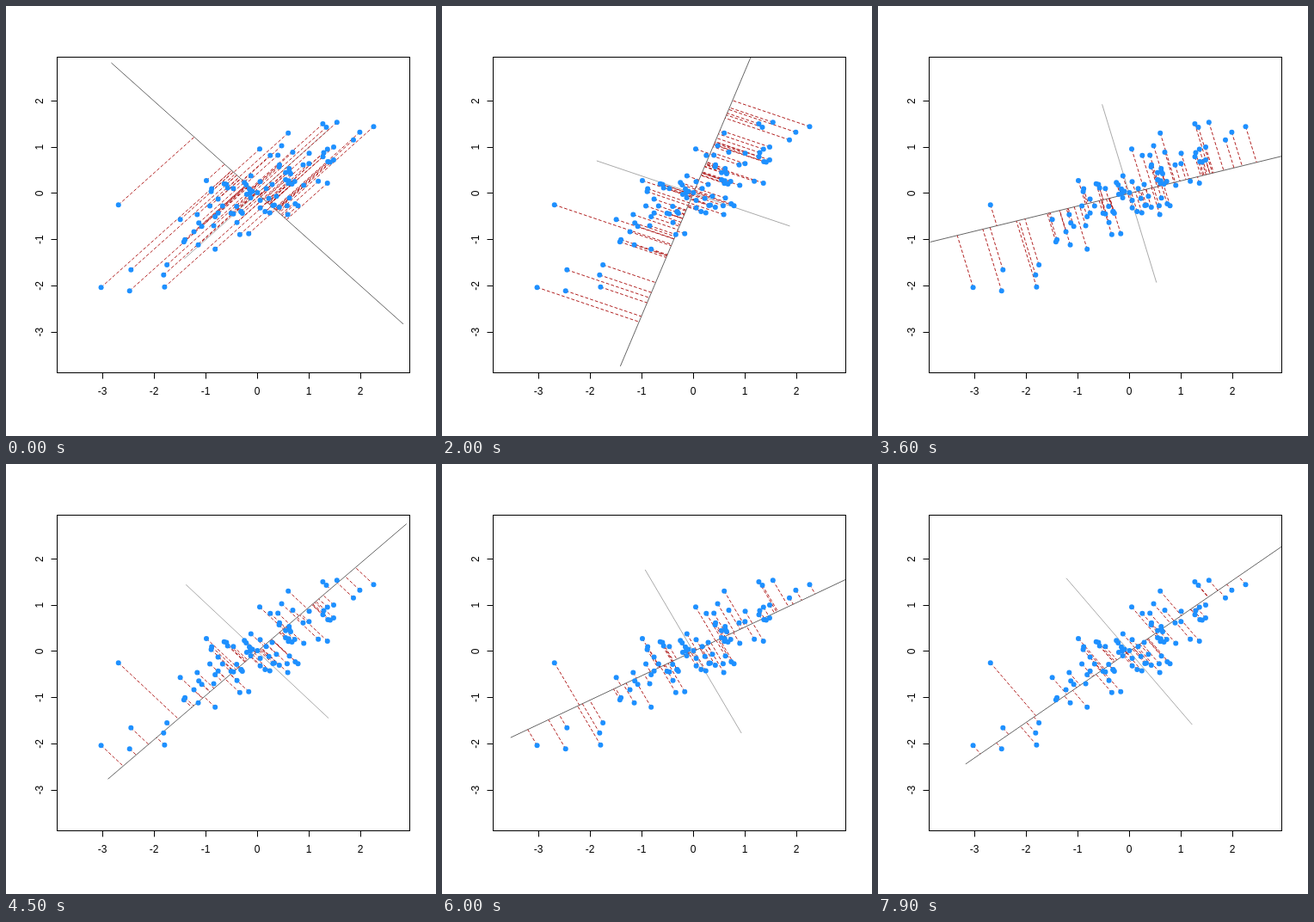
An HTML page with a canvas that plays this animation: 500 px wide and 500 px high, repeating every 8000 ms.

```html
<!DOCTYPE html>
<html>
<head>
<meta charset="utf-8">
<style>
html, body { margin: 0; width: 100%; height: 100%; overflow: hidden; background: #fff; }
canvas { display: block; }
</style>
</head>
<body>
<canvas id="stage" width="500" height="500"></canvas>
<script>
const ctx = document.getElementById('stage').getContext('2d');
const N = 100, STEPS = 80, STEP_MS = 100;
const BOX = { l: 59.04, t: 59.04, r: 469.76, b: 426.56 };

// Mersenne Twister seeded by a linear congruential generator
function uniforms(seed, count) {
  const next = () => seed = (Math.imul(69069, seed) + 1) >>> 0;
  for (let i = 0; i < 51; i++) next();
  const mt = Array.from({ length: 624 }, next);
  const out = [];
  for (let k = 0; k < count; k++) {
    let y = (mt[k] & 0x80000000) | (mt[k + 1] & 0x7fffffff);
    y = mt[k] = mt[(k + 397) % 624] ^ (y >>> 1) ^ (y & 1 ? 0x9908b0df : 0);
    y ^= y >>> 11;
    y ^= (y << 7) & 0x9d2c5680;
    y ^= (y << 15) & 0xefc60000;
    y ^= y >>> 18;
    out.push((y >>> 0) / 2 ** 32);
  }
  return out;
}

// Rational approximation of the normal quantile
function quantile(p) {
  const t = Math.sqrt(-2 * Math.log(Math.min(p, 1 - p)));
  const z = t - (2.515517 + t * (0.802853 + t * 0.010328)) /
    (1 + t * (1.432788 + t * (0.189269 + t * 0.001308)));
  return p < 0.5 ? -z : z;
}

function makePoints() {
  const u = uniforms(42, 4 * N), big = 2 ** 27;
  const z = Array.from({ length: 2 * N }, (_, i) =>
    quantile((Math.floor(big * u[2 * i]) + u[2 * i + 1]) / big));
  const pts = Array.from({ length: N }, (_, i) =>
    [z[i], 0.6 * z[i] + Math.sqrt(0.24) * z[i + N]]);
  const mean = k => pts.reduce((s, p) => s + p[k], 0) / N;
  const mx = mean(0), my = mean(1);
  return pts.map(([x, y]) => [x - mx, y - my]);
}

// Springs pull the rod towards the points; friction damps the swing
function makeAngles(pts) {
  const angles = [];
  let a = -45, speed = 0;
  for (let i = 0; i < STEPS; i++) {
    angles.push(a * Math.PI / 180);
    const c = Math.cos(angles[i]), s = Math.sin(angles[i]);
    const torque = pts.reduce((sum, [x, y]) => sum + (x * c + y * s) * (y * c - x * s), 0);
    speed = (speed + 0.025 * torque) * 0.93;
    a += speed;
  }
  return angles;
}

const points = makePoints();
const angles = makeAngles(points);

const xs = points.map(p => p[0]);
const lo = 1.2 * Math.min(...xs), hi = 1.2 * Math.max(...xs);
const pad = 0.04 * (hi - lo), span = hi - lo + 2 * pad;
const px = x => BOX.l + (x - lo + pad) / span * (BOX.r - BOX.l);
const py = y => BOX.b - (y - lo + pad) / span * (BOX.b - BOX.t);
const crisp = v => Math.floor(v) + 0.5;

function line(x1, y1, x2, y2) {
  ctx.beginPath();
  ctx.moveTo(x1, y1);
  ctx.lineTo(x2, y2);
  ctx.stroke();
}

function rod(angle, half, color) {
  const x = half * Math.cos(angle), y = half * Math.sin(angle);
  ctx.strokeStyle = color;
  line(px(-x), py(-y), px(x), py(y));
}

function drawAxes() {
  const l = crisp(BOX.l), t = crisp(BOX.t), r = crisp(BOX.r), b = crisp(BOX.b);
  ctx.strokeStyle = ctx.fillStyle = '#000';
  ctx.lineWidth = 1;
  ctx.strokeRect(l, t, r - l, b - t);
  ctx.font = '12px "Liberation Sans", Arial, sans-serif';
  ctx.textAlign = 'center';
  for (let v = -3; v <= 2; v++) {
    const x = crisp(px(v)), y = crisp(py(v));
    line(x, b, x, b + 7);
    line(l, y, l - 7, y);
    ctx.fillText(v, px(v), 452);
    ctx.save();
    ctx.translate(42.5, py(v));
    ctx.rotate(-Math.PI / 2);
    ctx.fillText(v, 0, 0);
    ctx.restore();
  }
}

function draw(angle) {
  const c = Math.cos(angle), s = Math.sin(angle);
  ctx.fillStyle = '#fff';
  ctx.fillRect(0, 0, 500, 500);
  ctx.save();
  ctx.beginPath();
  ctx.rect(BOX.l, BOX.t, BOX.r - BOX.l, BOX.b - BOX.t);
  ctx.clip();

  ctx.lineWidth = 1;
  rod(angle + Math.PI / 2, 2, '#aaa');
  rod(angle, 4, '#666');

  ctx.strokeStyle = '#b22222';
  ctx.setLineDash([3.75, 2.25]);
  for (const [x, y] of points) {
    const d = x * c + y * s;
    line(px(x), py(y), px(d * c), py(d * s));
  }
  ctx.setLineDash([]);

  ctx.fillStyle = '#1e90ff';
  for (const [x, y] of points) {
    ctx.beginPath();
    ctx.arc(px(x), py(y), 3, 0, 2 * Math.PI);
    ctx.fill();
  }
  ctx.restore();
  drawAxes();
}

function tick() {
  draw(angles[Math.floor(performance.now() / STEP_MS) % STEPS]);
  requestAnimationFrame(tick);
}
tick();
</script>
</body>
</html>
```
